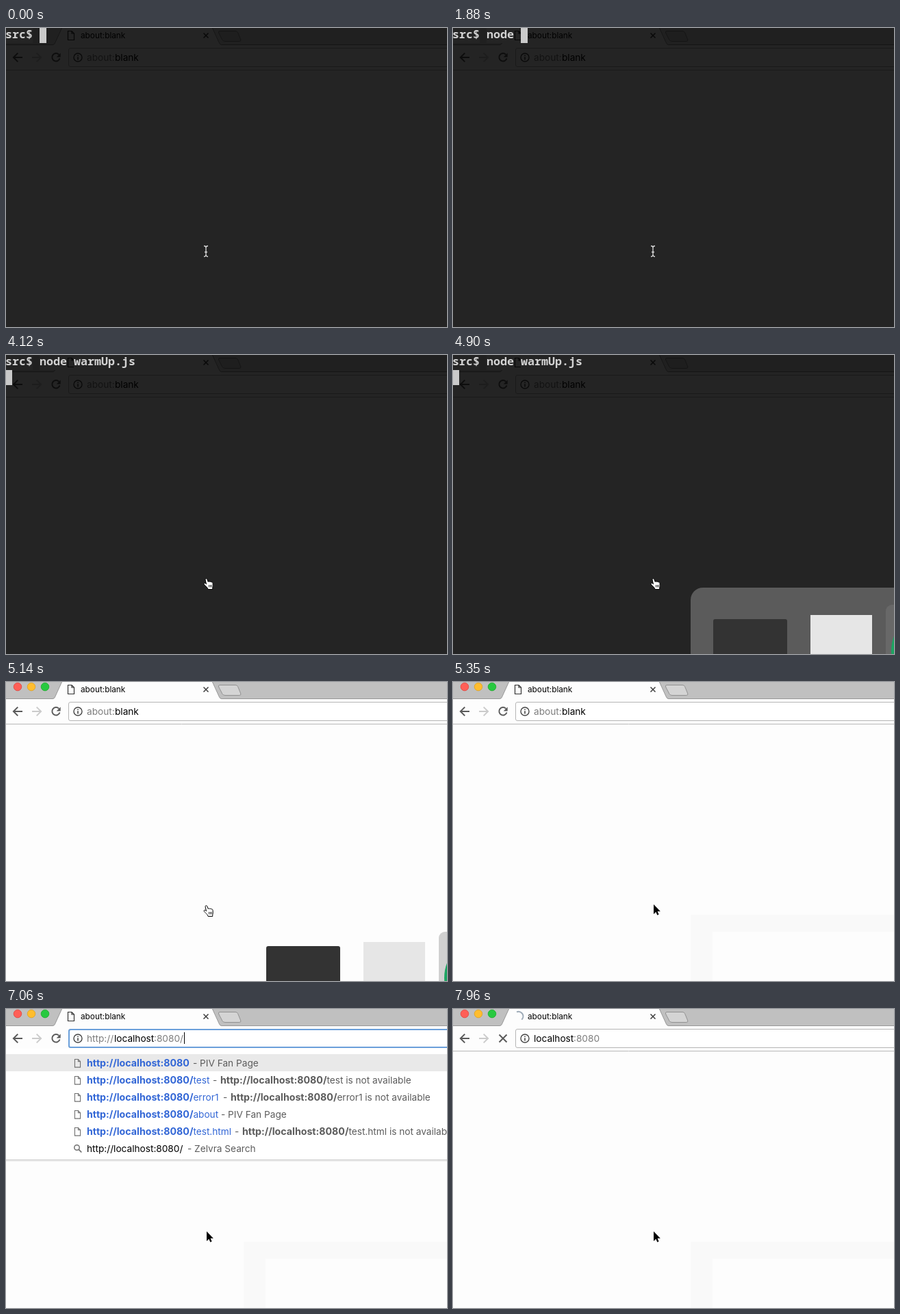
These frames come from a looping animation (644 px wide and 437 px high, 7990 ms). An HTML page:

```html
<!DOCTYPE html>
<html lang="en">
<head>
<meta charset="utf-8">
<title>Terminal to browser</title>
<style>
  @property --n { syntax: "<number>"; inherits: true; initial-value: 5; }

  html, body { margin: 0; width: 100%; height: 100%; overflow: hidden; background: #fdfdfd; }
  svg, .term { position: absolute; left: 0; top: 0; width: 644px; height: 437px; overflow: hidden; }

  /* Every part shares one clock: 7990 ms, hard changes by default. */
  .a { animation: 7990ms step-end infinite; }

  text { font: 13.65px Inter, "Open Sans", sans-serif; fill: #000; white-space: pre; }
  .title { font-size: 11.8px; }
  .dim { fill: #7d7d7d; }
  .note { fill: #5c5c5c; }
  .link { fill: #3367d6; }
  .b { font-size: 14.2px; font-weight: 700; }
  .line { fill: none; stroke: #5a5a5a; stroke-width: 2; }

  .term { background: rgba(0, 0, 0, .858); animation-name: term; }
  .typed, .block { position: absolute; top: 0; height: 22px; }
  .typed {
    left: 0; width: calc(var(--n) * 10px - 1px); overflow: hidden;
    font: 600 16.667px/17px "Noto Sans Mono", "DejaVu Sans Mono", monospace;
    color: #d2d2d2; white-space: pre; text-indent: -1px;
  }
  .typed span { display: inline-block; height: 22px; background: #242424; text-indent: 0; }
  .block { width: 10px; background: #cacaca; }
  .first { left: calc(var(--n) * 10px - 1px); animation-name: first; }
  .second { left: -1px; top: 22px; animation-name: second; }
  .keys { animation-name: keys; }

  .lit { animation-name: lit; }
  .ghost { animation-name: ghost; }
  .idle { animation-name: idle; }
  .selected { animation-name: selected; }
  .ring { animation-name: ring; }
  .drop { animation-name: drop; }
  .caret { animation-name: caret; }
  .ready { animation-name: ready; }
  .loading { animation-name: loading; }
  .switcher { animation-name: switcher; }
  .pick { animation-name: pick; }
  .beam { animation-name: beam; }
  .hand { animation-name: hand; }
  .arrow { animation-name: arrow; }

  @keyframes keys {
    0% { --n: 5; } 9.762% { --n: 6; } 12.39% { --n: 7; } 14.142% { --n: 8; }
    17.146% { --n: 9; } 23.529% { --n: 10; } 26.533% { --n: 11; }
    29.161% { --n: 12; } 30.162% { --n: 13; } 32.79%, to { --n: 20; }
  }
  @keyframes first { 0% { opacity: 1; } 44.055%, to { opacity: 0; } }
  @keyframes second { 0% { opacity: 0; } 44.055%, to { opacity: 1; } }
  @keyframes term { 0% { opacity: 1; } 64.33%, to { opacity: 0; } }
  @keyframes lit { 0% { opacity: 0; } 64.33%, to { opacity: 1; } }
  @keyframes ghost { 0% { opacity: 0; } 66.958%, to { opacity: 1; } }
  @keyframes idle { 0% { opacity: 1; } 82.352%, to { opacity: 0; } }
  @keyframes selected { 0% { opacity: 0; } 82.352% { opacity: 1; } 88.36%, to { opacity: 0; } }
  @keyframes ring { 0% { opacity: 0; } 82.352% { opacity: 1; } 99.624%, to { opacity: 0; } }
  @keyframes drop { 0% { opacity: 0; } 88.36% { opacity: 1; } 99.624%, to { opacity: 0; } }
  @keyframes caret { 0% { opacity: 0; } 88.36% { opacity: 1; } 95.118%, to { opacity: 0; } }
  @keyframes ready { 0% { opacity: 1; } 99.624%, to { opacity: 0; } }
  @keyframes loading { 0% { opacity: 0; } 99.624%, to { opacity: 1; } }
  @keyframes switcher {
    0% { opacity: 0; }
    55.694% { opacity: 1; }
    64.33% { opacity: 1; animation-timing-function: steps(6); }
    66.958%, to { opacity: 0; }
  }
  @keyframes pick { 0% { transform: none; } 61.326%, to { transform: translateX(133px); } }
  @keyframes beam { 0% { opacity: 1; } 51.564%, to { opacity: 0; } }
  @keyframes hand { 0% { opacity: 0; } 51.564% { opacity: 1; } 65.8%, to { opacity: 0; } }
  @keyframes arrow { 0% { opacity: 0; } 65.8%, to { opacity: 1; } }
</style>
</head>
<body>
<svg viewBox="0 0 644 437">
  <defs>
    <path id="doc" d="M.5.5h5.5l3.5 3.5v9.5h-9zM6 .5V4h3.5" fill="none"/>
  </defs>

  <!-- page -->
  <rect width="644" height="437" fill="#fdfdfd"/>
  <g class="a ghost">
    <path d="M347 340H644V437H347z" fill="#f9f9f9"/>
    <path d="M379 365H644V437H379z" fill="#fdfdfd"/>
  </g>

  <!-- tab strip -->
  <rect width="644" height="25" fill="#e2e2e2"/>
  <g class="a lit">
    <rect width="644" height="25" fill="#c0c0c0"/>
    <g stroke-width=".8">
      <circle cx="17" cy="7" r="5.8" fill="#ff5f57" stroke="#e0443e"/>
      <circle cx="37" cy="7" r="5.8" fill="#ffbd2e" stroke="#dea123"/>
      <circle cx="57" cy="7" r="5.8" fill="#28c940" stroke="#1aab29"/>
    </g>
  </g>
  <path d="M0 25V24.5H68Q70.500 24.500 71.500 22L82 -1H301L311.500 22Q312.500 24.500 315 24.500H644V25z" fill="#fdfdfd"/>
  <path d="M0 24.500H68Q70.500 24.500 71.500 22L82 -1M301 -1L311.500 22Q312.500 24.500 315 24.500H644" fill="none" stroke="#979797"/>
  <path d="M312 4.500H335q2.500 0 3.500 2l4.300 10.500q.7 2.500-2 2.500H320q-3 0-4-2L310.500 7q-.5-2.500 1.500-2.500z" fill="#d4d4d4" stroke="#919191"/>
  <use class="a ready" href="#doc" x="90" y="4" stroke="#333" stroke-width="1.200"/>
  <path class="a loading" d="M93 4.300A6.800 6.800 0 0 1 100.300 15.500" fill="none" stroke="#9eabb8" stroke-width="2"/>
  <text class="title" x="109" y="15.300">about:blank</text>
  <path class="line" d="M288.500 7.500l7 7m0-7l-7 7" style="stroke:#444;stroke-width:1.600"/>

  <!-- toolbar -->
  <path d="M0 61.500H644" stroke="#b8b8b8"/>
  <path class="line" d="M24 43H11M17.300 36.600L10.900 43l6.400 6.400"/>
  <path class="line" d="M38 43H51M44.700 36.600L51.100 43l-6.400 6.400" style="stroke:#cbcbcb"/>
  <g class="a ready">
    <path class="line" d="M77.200 38.900A5.700 5.700 0 1 0 78.500 44.500"/>
    <path d="M79.700 36.500V42.500H73.700z" fill="#5a5a5a"/>
  </g>
  <path class="a loading line" d="M67.500 37.500l11 11m0-11l-11 11"/>
  <rect x="91.500" y="29.500" width="570" height="27" rx="2.500" fill="#fff" stroke="#b5b5b5"/>

  <text class="a idle" x="118" y="48"><tspan class="dim">about:</tspan><tspan x="159">blank</tspan></text>
  <g class="a selected">
    <path d="M118 34H195V51H118z" fill="#b3d7ff"/>
    <text x="118" y="48">about:blank</text>
  </g>

  <!-- suggestions -->
  <g class="a drop">
    <path d="M0 58H644V220H0z" fill="#fff"/>
    <path d="M0 66H644V91H0z" fill="#e9e9e9"/>
    <path d="M0 220.500H644" stroke="#cacaca"/>
    <path d="M0 222H644" stroke="#ececec" stroke-width="2"/>
    <g stroke="#707070" stroke-width="1.200">
      <use href="#doc" transform="translate(100 73) scale(.9)"/>
      <use href="#doc" transform="translate(100 98) scale(.9)"/>
      <use href="#doc" transform="translate(100 123) scale(.9)"/>
      <use href="#doc" transform="translate(100 148) scale(.9)"/>
      <use href="#doc" transform="translate(100 173) scale(.9)"/>
      <path d="M106.300 205.300l4 4.200" stroke-width="1.800"/>
      <circle cx="103.500" cy="202.500" r="3.700" fill="none" stroke-width="1.500"/>
    </g>
    <text class="note" x="118" y="84"><tspan class="b link">http://localhost:8080</tspan><tspan x="273">- PIV Fan Page</tspan></text>
    <text class="note" x="118" y="109"><tspan class="b link">http://localhost:8080/</tspan><tspan class="link">test</tspan><tspan x="302">- </tspan><tspan class="b" x="313">http://localhost:8080/</tspan>test is not available</text>
    <text class="note" x="118" y="134"><tspan class="b link">http://localhost:8080/</tspan><tspan class="link">error1</tspan><tspan x="317">- </tspan><tspan class="b" x="328">http://localhost:8080/</tspan>error1 is not available</text>
    <text class="note" x="118" y="159"><tspan class="b link">http://localhost:8080/</tspan><tspan class="link">about</tspan><tspan x="314">- PIV Fan Page</tspan></text>
    <text class="note" x="118" y="184"><tspan class="b link">http://localhost:8080/</tspan><tspan class="link">test.html</tspan><tspan x="334">- </tspan><tspan class="b" x="345">http://localhost:8080/</tspan>test.html is not available</text>
    <text x="118" y="209">http://localhost:8080/<tspan class="note" x="265">- Zelvra Search</tspan></text>
    <text class="dim" x="118" y="48">http://<tspan x="158" fill="#000">localhost</tspan><tspan x="216">:8080/</tspan></text>
  </g>
  <rect class="a ring" x="92" y="30" width="570" height="26" rx="2.500" fill="none" stroke="#6a9fda" stroke-width="2"/>
  <path class="a caret" d="M260 34h1v17h-1z"/>
  <text class="a loading" x="118" y="48">localhost<tspan class="dim" x="176">:8080</tspan></text>

  <circle cx="105" cy="43" r="6" fill="none" stroke="#444" stroke-width="1.400"/>
  <path d="M104.200 39.500h1.600v1.600h-1.600zM104.200 42.200h1.600v4.300h-1.600z" fill="#444"/>
</svg>

<div class="term a">
  <div class="a keys">
    <div class="typed"><span>src$</span> <span>node</span> <span>warmUp.js</span> </div>
    <div class="block first a"></div>
  </div>
  <div class="block second a"></div>
</div>

<svg viewBox="0 0 644 437">
  <!-- application switcher -->
  <g class="a switcher">
    <rect x="347" y="340" width="420" height="190" rx="18" fill="#fff" fill-opacity=".25"/>
    <rect class="a pick" x="499" y="365" width="133" height="150" rx="9" fill="#808080" fill-opacity=".36"/>
    <rect x="380" y="386" width="108" height="108" rx="3" fill="#333"/>
    <rect x="522" y="380" width="90" height="90" fill="#e6e6e6"/>
    <circle cx="699" cy="432" r="59" fill="#1da462"/>
  </g>

  <!-- pointers -->
  <path class="a beam" d="M289 318.500q3 0 3 2.500v10.500q0 2.500-3 2.500M295 318.500q-3 0-3 2.500M292 331.500q0 2.500 3 2.500M290 327.500h4" fill="none" stroke="#d8d8d8" stroke-width="1.300"/>
  <g class="a hand" fill="#fff" stroke="#000" stroke-linejoin="round">
    <path d="M291 328.200c0-1.600 2.200-2 2.800-.5l1.400 3.900c.6-1 2-.9 2.400 0 .8-.7 2-.4 2.300.5 1-.4 2 .2 2.100 1.200l.3 4.200c0 1.200-.6 1.800-.6 3.200v1.800h-6.600c-.6-2.400-2.200-3.400-3.600-5-.9-1-2.400-2-2.400-3.100 0-1.200 1.600-1.400 2.400-.5l1 .9z"/>
    <path d="M296.500 336v3.500M298.500 336v3.500M300.300 336v3.500" stroke-width=".8"/>
  </g>
  <path class="a arrow" d="M293 325v14.200l3.300-3.100 2 4.600 2.300-1-2-4.500h4.300z" stroke="#fff" stroke-width="1.400" paint-order="stroke"/>
</svg>
</body>
</html>
```
